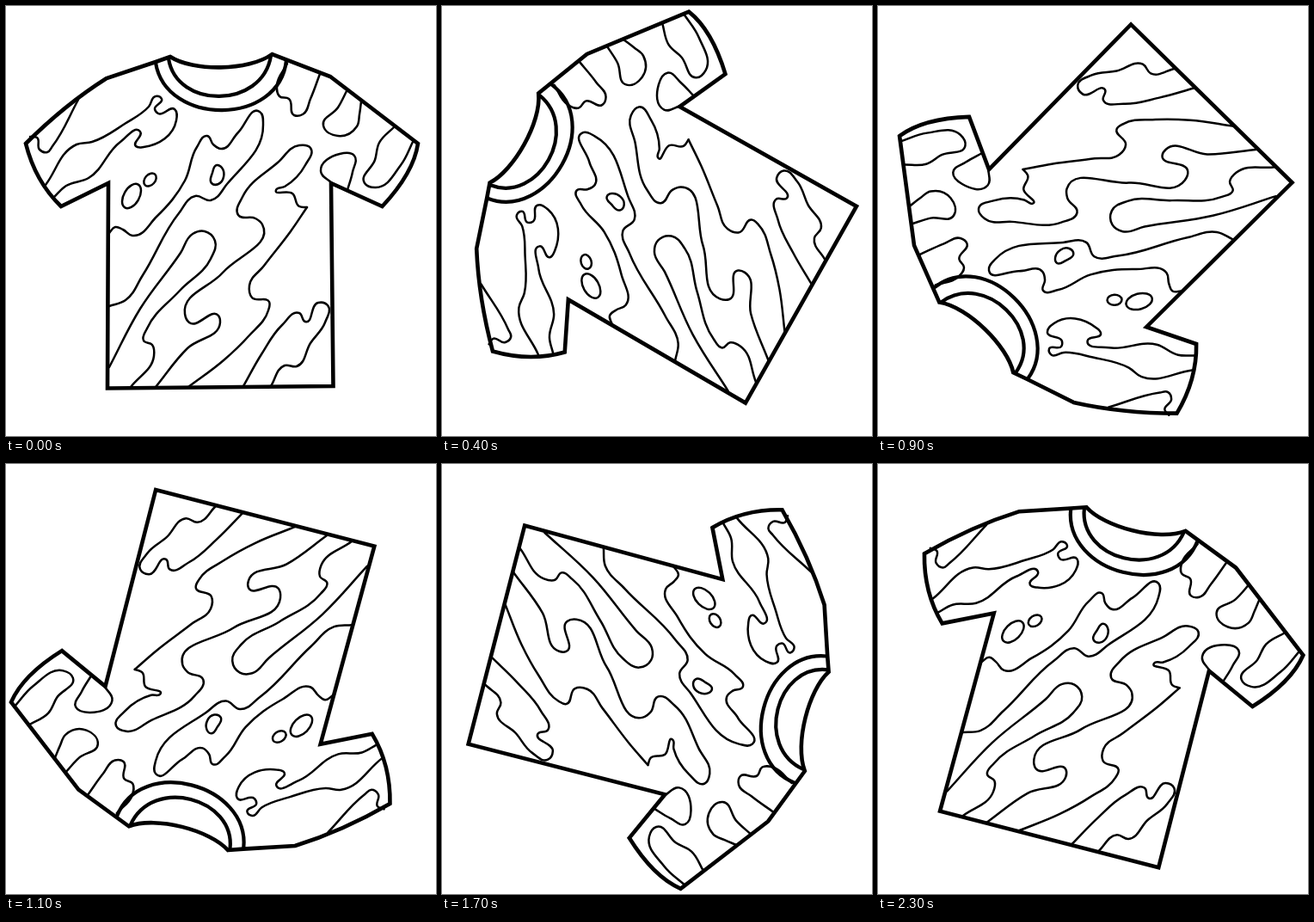
Animation of 500x500 px, one loop 2400 ms. Source, as an HTML page:

```html
<!DOCTYPE html>
<html lang="en">
<head>
<meta charset="utf-8">
<title>Spinning shirt</title>
<style>
  html, body { margin: 0; width: 100%; height: 100%; overflow: hidden; background: #fff; }
  svg { display: block; width: 100%; height: 100%; }
  #shirt { fill: none; stroke: #000; stroke-linecap: round; stroke-linejoin: round; }
  .outline { stroke-width: 4.6; stroke-linejoin: miter; }
  .collar { stroke-width: 4.2; stroke-linecap: butt; }
  .pattern { stroke-width: 2.5; }
</style>
</head>
<body>
<svg viewBox="0 0 500 500">
  <g id="shirt">
    <g class="pattern">
      <!-- left sleeve -->
      <path data-via="28,152 36,153 39,167 48,170 54,163 84,109"/>
      <path data-via="46,208 82,161 100,158 138,137 166,117 174,105 181,108 173,120 177,125 196,120 198,133 160,164 151,163 156,146 133,158 96,200 70,209 56,222"/>
      <!-- spots -->
      <ellipse rx="9" ry="15.5" transform="translate(146 221) rotate(30)"/>
      <ellipse rx="6" ry="8.5" transform="translate(167.5 202) rotate(42)"/>
      <path data-via="245,185 251,188 247,207 239,206 240,194 245,185"/>
      <!-- body -->
      <path data-via="120,264 127,257 136,260 147,267 175,245 208,203 222,164 234,151 241,161 250,166 270,147 295,123 299,138 257,207 238,226 220,221 201,241 159,313 139,342 120,349"/>
      <path data-via="120,420 156,352 203,287 217,265 231,262 243,273 238,294 202,331 164,375 160,389 170,394 172,407 145,443"/>
      <path data-via="174,443 211,398 249,368 247,360 213,368 208,358 252,310 298,254 290,247 270,243 275,222 316,182 341,162 354,165 348,185 324,210 314,214 333,218 341,233 350,234"/>
      <path data-via="350,234 331,262 300,302 283,325 286,339 306,344 305,354 282,384 253,412 212,443"/>
      <path data-via="276,442 297,405 321,371 341,357 348,367 363,345 374,348 371,368 354,392 338,419 324,418 308,442"/>
      <!-- right sleeve -->
      <path data-via="327,67 315,92 318,105 329,108 335,127 345,126 354,108 365,79"/>
      <path data-via="397,97 386,118 369,139 386,151 408,140 411,126 413,111"/>
      <path data-via="379,206 366,192 388,172 405,174 403,193 397,214"/>
      <path data-via="452,140 434,159 429,179 417,206 430,211 459,185 474,156"/>
    </g>
    <g class="collar">
      <path d="M174 66C186 140 318 140 326 63"/>
      <path d="M189 61C198 120 298 120 308 58"/>
    </g>
    <path class="outline" d="M191 59L174 65L117 84Q68 115 23 160Q34 204 64 233L119 206L118 444.5L380.5 442L378 206L437.5 233Q474 194 479 160L377 82L309.5 56C282 76 217 76 191 59Z"/>
  </g>
</svg>
<script>
  const LOOP = 2400, STEPS = 24, HANDLE = 0.37;
  const shirt = document.getElementById('shirt');
  const start = performance.now();

  // Smooth curve through the given points; equal end points make a closed loop.
  function smoothPath(via) {
    const pts = via.split(' ').map(pair => pair.split(',').map(Number));
    const last = pts.length - 1;
    const closed = String(pts[0]) === String(pts[last]);
    const before = i => pts[i > 0 ? i - 1 : closed ? last - 1 : 0];
    const after = i => pts[i < last ? i + 1 : closed ? 1 : last];

    const tangents = pts.map(([x, y], i) => {
      const [px, py] = before(i), [nx, ny] = after(i);
      const weight = (dx, dy) => Math.hypot(dx, dy) ** -1.5 || 0;
      const safe = w => Number.isFinite(w) ? w : 0;
      const a = safe(weight(x - px, y - py)), b = safe(weight(nx - x, ny - y));
      const tx = (x - px) * a + (nx - x) * b, ty = (y - py) * a + (ny - y) * b;
      const length = Math.hypot(tx, ty) || 1;
      return [tx / length, ty / length];
    });

    let d = `M${pts[0]}`;
    for (let i = 0; i < last; i++) {
      const [x, y] = pts[i], [nx, ny] = pts[i + 1];
      const [tx, ty] = tangents[i], [ux, uy] = tangents[i + 1];
      const h = HANDLE * Math.hypot(nx - x, ny - y);
      d += `C${x + tx * h},${y + ty * h} ${nx - ux * h},${ny - uy * h} ${nx},${ny}`;
    }
    return d;
  }

  for (const path of document.querySelectorAll('[data-via]')) {
    path.setAttribute('d', smoothPath(path.dataset.via));
  }

  function draw(time) {
    const step = Math.floor((time % LOOP) / LOOP * STEPS);
    shirt.setAttribute('transform', `rotate(${-360 * step / STEPS} 250.2 249.6)`);
  }

  function tick(now) {
    draw(Math.max(0, now - start));
    requestAnimationFrame(tick);
  }

  draw(0);
  requestAnimationFrame(tick);
</script>
</body>
</html>
```
